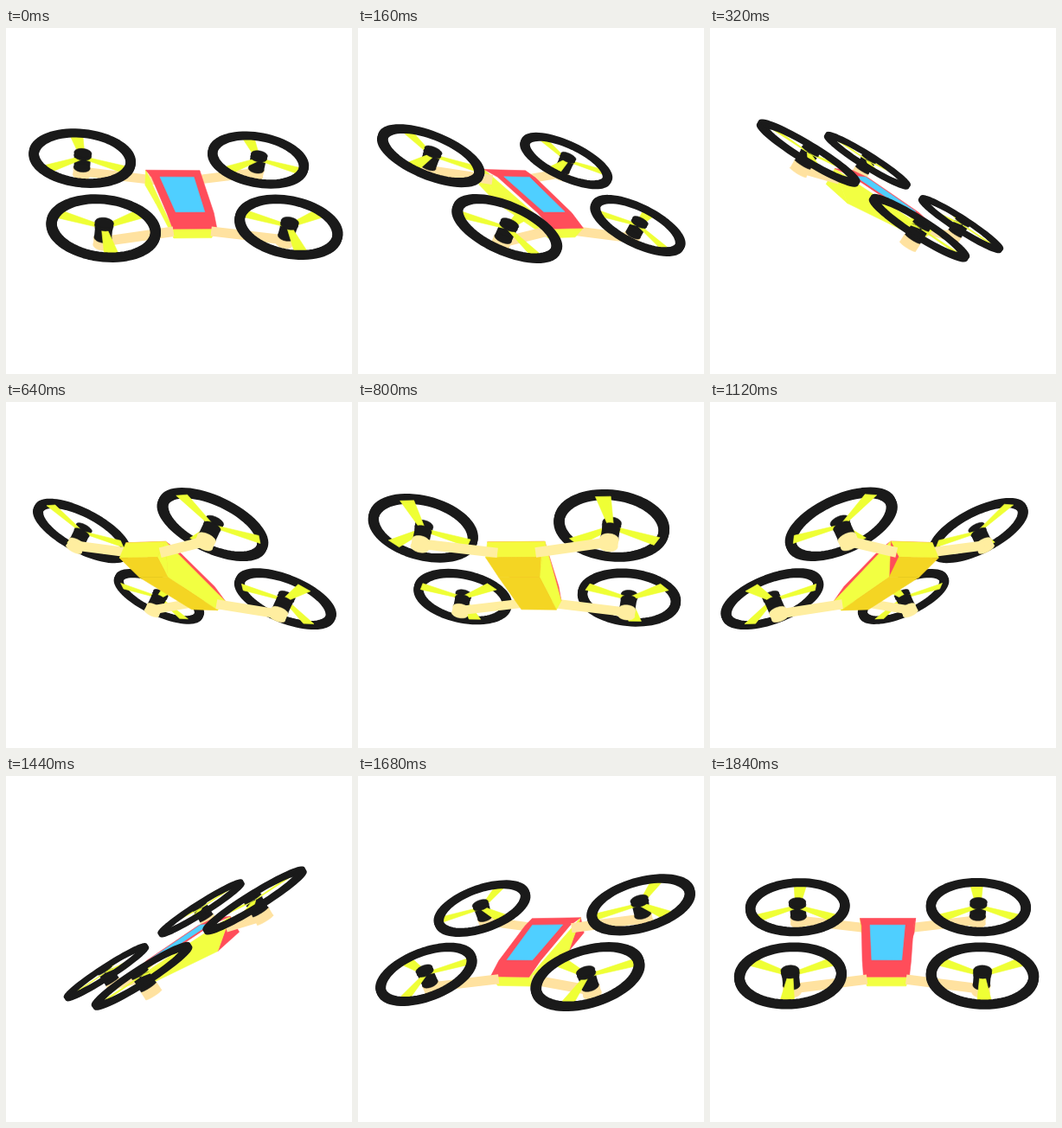
An HTML page with a canvas that plays this animation: 400x400 px, repeating every 1.92 s.

```html
<!DOCTYPE html>
<html lang="en">
<head>
<meta charset="utf-8">
<title>Spinning drone</title>
<style>
  html, body { margin: 0; width: 100%; height: 100%; overflow: hidden; background: #fff; }
  canvas { display: block; width: 100%; height: 100%; }
</style>
</head>
<body>
<canvas id="stage" width="400" height="400"></canvas>
<script>
const ctx = document.getElementById('stage').getContext('2d');
const RAD = Math.PI / 180;
const STEP_MS = 80, STEPS = 24, START = 14;
const TILT = 33.1 * RAD, DIST = 1250, LEAN = 0.35;
const BLACK = '#1a1a1a', RED = '#ff4d5a', CYAN = '#4fcfff', LIME = '#f2ff42';
const REAR = '#f5fa3e', BASE = '#f4d523', BLADE = '#efff35';
const ROTOR_Y = 15, ARM_Y = -4;

let sin = 0, cos = 1;

// Tilt the drone, spin it about the vertical, then apply perspective.
function project([x, y, z]) {
  x += 4;
  const up = y * Math.cos(TILT) - z * Math.sin(TILT);
  const out = z * Math.cos(TILT) + y * Math.sin(TILT);
  const depth = out * cos - x * sin;
  const s = DIST / (DIST - depth - LEAN * up);
  return { x: 200.8 + s * (x * cos + out * sin), y: 201.5 - s * up, s, depth };
}

function trace(points) {
  points.forEach((p, i) => i ? ctx.lineTo(p.x, p.y) : ctx.moveTo(p.x, p.y));
  ctx.closePath();
}

// The hairline outline closes the seams between neighbouring faces.
function fill(points, color) {
  ctx.beginPath();
  trace(points);
  ctx.fillStyle = ctx.strokeStyle = color;
  ctx.lineWidth = 0.6;
  ctx.fill();
  ctx.stroke();
}

function area(points) {
  return points.reduce((sum, p, i) => {
    const q = points[(i + 1) % points.length];
    return sum + p.x * q.y - q.x * p.y;
  }, 0);
}

function circle([x, y, z], r) {
  return Array.from({ length: 72 }, (_, i) => {
    const a = i * 5 * RAD;
    return project([x + r * Math.cos(a), y, z + r * Math.sin(a)]);
  });
}

function rod(from, to, width, color) {
  const a = project(from), b = project(to);
  ctx.beginPath();
  ctx.moveTo(a.x, a.y);
  ctx.lineTo(b.x, b.y);
  ctx.lineWidth = width * (a.s + b.s) / 2;
  ctx.strokeStyle = color;
  ctx.stroke();
}

function cylinder(x, z, low, high, r, color) {
  rod([x, low, z], [x, high, z], 2 * r, color);
  fill(circle([x, low, z], r), color);
  fill(circle([x, high, z], r), color);
}

// Orders the corners so that every face winds the same way seen from outside.
function face(color, ...pts) {
  const [a, b, c] = pts;
  const u = b.map((v, i) => v - a[i]), v = c.map((w, i) => w - a[i]);
  const n = [u[1] * v[2] - u[2] * v[1], u[2] * v[0] - u[0] * v[2], u[0] * v[1] - u[1] * v[0]];
  const away = n[0] * a[0] + n[1] * (a[1] + 6) + n[2] * a[2];
  return { color, pts: away < 0 ? pts.reverse() : pts };
}

const row = (w, y, z) => [[-w, y, z], [w, y, z]];
const rearTop = row(33, 5, -62), rearLow = row(31.6, -15.6, -62);
const keel = row(24, -21.5, -31);
const frontTop = row(25.5, 5, 62), frontLow = row(22, -9, 60);
const crownRear = row(30.5, 8.5, -40), crownFront = row(27.5, 8.5, 35);
const strip = (color, p, q) => face(color, p[0], p[1], q[1], q[0]);
const side = i => [
  face(i ? RED : LIME, rearTop[i], rearLow[i], keel[i]),
  face(LIME, rearTop[i], keel[i], frontLow[i], frontTop[i])
];
const hull = [
  strip(REAR, rearTop, rearLow),
  strip(LIME, frontTop, frontLow),
  ...side(0), ...side(1),
  strip(BASE, rearLow, keel),
  strip(BASE, keel, frontLow)
];
const lid = face(RED, rearTop[0], rearTop[1], crownRear[1], crownFront[1],
  frontTop[1], frontTop[0], crownFront[0], crownRear[0]);
const screen = strip(CYAN, row(20.5, 9, -40.5), row(17, 9, 33.7));

function drawBody(above) {
  if (!above) fill(lid.pts.map(project), RED);
  for (const f of hull) {
    const pts = f.pts.map(project);
    if (area(pts) < 0) fill(pts, f.color);
  }
  if (above) for (const f of [lid, screen]) fill(f.pts.map(project), f.color);
}

function drawRing(x, z) {
  for (const lift of [-1.8, 0, 1.8]) {
    const hub = [x, ROTOR_Y + lift, z];
    ctx.beginPath();
    trace(circle(hub, 60.4));
    trace(circle(hub, 52));
    ctx.fillStyle = ctx.strokeStyle = BLACK;
    ctx.lineWidth = 3;
    ctx.fill('evenodd');
    ctx.stroke();
  }
}

function drawBlades(x, z) {
  for (let i = 0; i < 3; i++) {
    const a = i * 120 * RAD, dir = Math.sign(z);
    const at = (r, w) => project([
      x + r * Math.sin(a) + w * Math.cos(a),
      ROTOR_Y,
      z + dir * (r * Math.cos(a) - w * Math.sin(a))
    ]);
    fill([at(3, -3), at(3, 3), at(53, 8), at(53, -8)], BLADE);
  }
}

function drawRotor(x, z, above) {
  const light = above ? '#ffe2a0' : '#ffeea0';
  const parts = [
    () => cylinder(x, z, -9, 0, 10, light),
    () => rod([Math.sign(x) * 22, ARM_Y, Math.sign(z) * 54], [x, ARM_Y, z], 11, light),
    () => cylinder(x, z, 1, 14, 9.5, BLACK),
    () => drawBlades(x, z),
    () => cylinder(x, z, 17, 21, 10, BLACK),
    () => drawRing(x, z)
  ];
  if (!above) {
    parts.reverse();
    [parts[4], parts[5]] = [parts[5], parts[4]];
  }
  parts.forEach(draw => draw());
}

function render(step) {
  const angle = (START + step * 360 / STEPS) * RAD;
  sin = Math.sin(angle);
  cos = Math.cos(angle);
  ctx.fillStyle = '#fff';
  ctx.fillRect(0, 0, 400, 400);

  const items = [{ depth: 0, draw: () => drawBody(area(lid.pts.map(project)) < 0) }];
  for (const [half, z] of [[107.3, -72.5], [105.6, 72.5]]) for (const x of [-half, half]) {
    const above = area(circle([x, ROTOR_Y, z], 60)) > 0;
    items.push({
      depth: project([x, ROTOR_Y, z]).depth,
      draw: () => drawRotor(x, z, above)
    });
  }
  items.sort((a, b) => a.depth - b.depth).forEach(item => item.draw());
}

const begin = performance.now();
function tick() {
  const time = Math.max(0, performance.now() - begin);
  render(Math.floor(time / STEP_MS) % STEPS);
  requestAnimationFrame(tick);
}
ctx.lineJoin = 'round';
tick();
</script>
</body>
</html>
```
